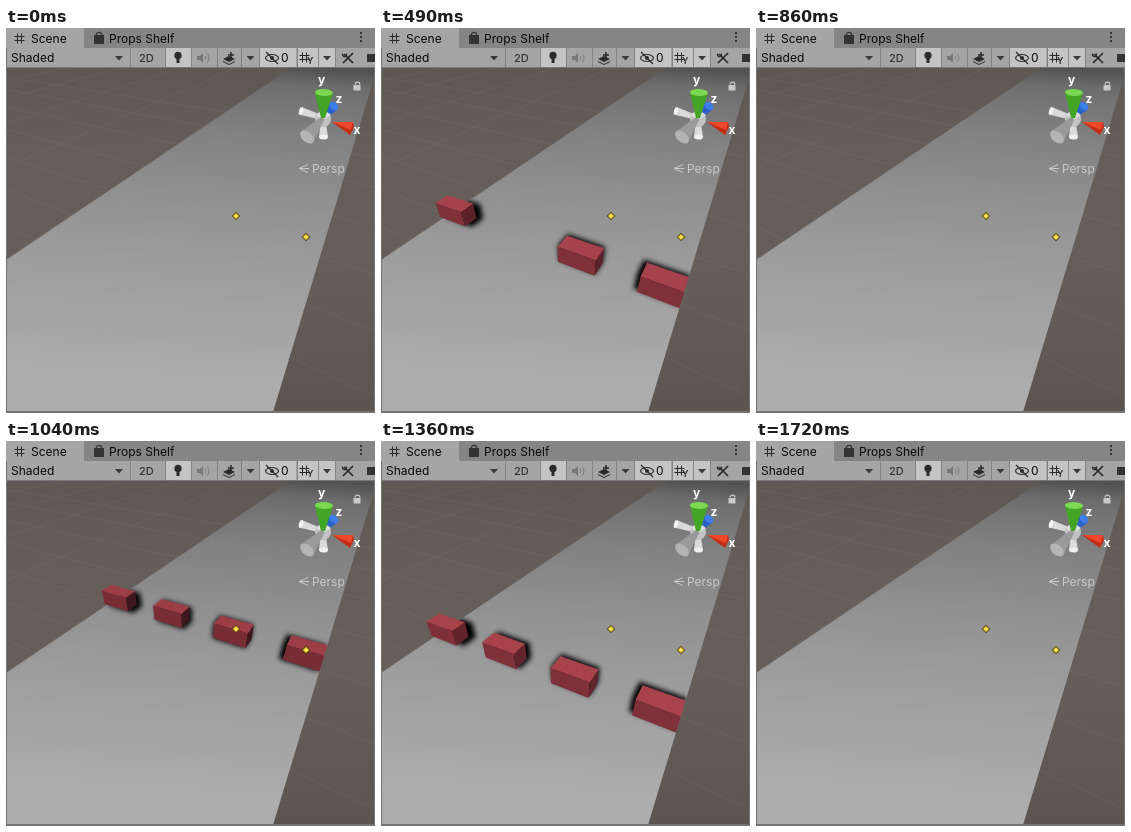
Write an HTML page with a canvas that moves like this. It is 369x385 px and loops after 1810 ms.

```html
<!DOCTYPE html>
<html lang="en">
<meta charset="utf-8">
<title>Sliding boxes in a scene view</title>
<style>
  html, body { margin: 0; width: 100%; height: 100%; overflow: hidden; background: #655e58; }
  canvas { display: block; }
</style>
<canvas id="stage" width="369" height="385"></canvas>
<script>
const ctx = document.getElementById('stage').getContext('2d');
const LOOP = 1810, FPS = 22;
const FONT = 'Inter, Arial, sans-serif';
const INK = '#2b2b2b', TRIM = '#858585', BAR = '#a5a5a5', LIT = '#c4c4c4', PALE = '#c9c9c9';

// Vanishing points: down the ramp, across it, and along its normal.
const RAMP = { x: 393, y: -31 }, ACROSS = { x: -499, y: -31 }, NORMAL = { x: 184, y: 565 };
const SHADE = { x: 215, y: 200 };    // shadows lean towards this point
const rampShape = [[0, 232], [285, 40], [371, 40], [267, 384], [0, 384]];
const openSide = [[-40, 40], [371, 40], [267, 384], [-40, 384]];

function trace(points) {
  ctx.beginPath();
  points.forEach(([x, y]) => ctx.lineTo(x, y));
}
function poly(points, fill) {
  trace(points);
  ctx.fillStyle = fill;
  ctx.fill();
}
function stroke(color, width = 1) {
  ctx.strokeStyle = color;
  ctx.lineWidth = width;
  ctx.stroke();
}
function line(points, color, width) {
  trace(points);
  stroke(color, width);
}
function arc(x, y, r, from, to, color, width) {
  ctx.beginPath();
  ctx.arc(x, y, r, from, to);
  stroke(color, width);
}
function rect(x, y, w, h, fill) {
  ctx.fillStyle = fill;
  ctx.fillRect(x, y, w, h);
}
function oval(x, y, rx, ry, fill, turn = 0) {
  ctx.beginPath();
  ctx.ellipse(x, y, rx, ry, turn, 0, 7);
  ctx.fillStyle = fill;
  ctx.fill();
}
function label(text, x, y, fill = '#090909', weight = 400, size = 12) {
  ctx.font = `${weight} ${size}px ${FONT}`;
  ctx.fillStyle = fill;
  ctx.fillText(text, x, y);
}
function clipped(shape, draw) {
  ctx.save();
  trace(shape);
  ctx.clip();
  draw();
  ctx.restore();
}

function ground() {
  const soil = ctx.createLinearGradient(0, 40, 0, 384);
  ['#5e5853', '#655e58', '#665f59', '#625b55', '#5c554f'].forEach((c, i) => soil.addColorStop(i / 4, c));
  rect(0, 40, 369, 345, soil);
  const ray = (from, slope, reach) =>
    line([[from.x, from.y], [from.x + reach, from.y + reach * slope]], 'rgba(170,170,170,.09)');
  for (let i = 0; i < 12; i++) {
    ray(RAMP, -1 / (1.5 + i * .8), -500);
    ray(ACROSS, .16 + i * .02 + i * i * .005, 900);
  }
  const slab = ctx.createLinearGradient(300, 40, 278, 384);
  for (let p = 0; p <= 1; p += .05) {
    const v = Math.round(82 + 93 * p ** .43);
    slab.addColorStop(p, `rgb(${v},${v},${v})`);
  }
  poly(rampShape, slab);
}

// a: sideways slope on the ramp, u: inverse distance, h: height above it.
function project(a, u, h) {
  const w = u - h;
  return [(RAMP.x * u - a - h * NORMAL.x) / w, (RAMP.y * u + 1 - h * NORMAL.y) / w];
}

function box(lane, age) {
  const a = .73 + .351 * (2 - lane);
  const u = .004456 + .000385 * (2 - lane) - 3.1e-9 * age * age;
  const corners = h => [[-1, -1], [1, -1], [1, 1], [-1, 1]].map(([side, near]) =>
    project(a - side * .086, u - side * .000094 - near * .000083, h));
  const [bl, br, fr, fl] = corners(.000165);
  const [, lowBr, lowFr, lowFl] = corners(0);

  const near = Math.min(1, Math.max(0, (age - 300) / 400));
  const tint = (r, g, b, k) => `rgb(${r * k},${g * k},${b * k})`;
  const [x, y] = project(a, u, 0);
  const dx = (SHADE.x - x) / 20, dy = (SHADE.y - y) / 20;

  clipped(rampShape, () => {
    ctx.filter = 'blur(2.5px)';
    poly([bl, br, lowBr, lowFr, lowFl, fl].map(([px, py]) => [px + dx, py + dy]), '#000');
  });
  clipped(openSide, () => {
    const light = .88 + .12 * near;
    poly([fl, fr, lowFr, lowFl], tint(136, 51, 60, light));
    poly([br, fr, lowFr, lowBr], tint(136, 51, 60, .45 + .5 * near));
    poly([bl, br, fr, fl], tint(178, 71, 80, light));
  });
}

function boxes(t) {
  const step = Math.ceil((Math.floor(t / 10) * 10 + 10) * FPS / 1000) - 1;
  if (step > 0 && step < 19) [0, 2, 3].forEach(lane => box(lane, 12 + 46 * step));
  if (step > 20 && step < 38) [0, 1, 2, 3].forEach(lane => box(lane, 60 + 50 * (step - 21)));
}

function marker(x, y) {
  const diamond = (r, fill) => poly([[x, y - r], [x + r, y], [x, y + r], [x - r, y]], fill);
  diamond(4.3, '#55471b');
  diamond(3.1, '#f3cd31');
  diamond(1.3, '#fff08a');
}

// Cone with its tip at the gizmo's centre and its base at (x, y).
function cone(x, y, r, depth, side, cap) {
  const cx = 317, cy = 90, turn = Math.atan2(y - cy, x - cx) + Math.PI / 2;
  const ox = Math.cos(turn), oy = Math.sin(turn);
  poly([[cx - ox * 2, cy - oy * 2], [cx + ox * 2, cy + oy * 2],
        [x + ox * r, y + oy * r], [x - ox * r, y - oy * r]], side);
  oval(x, y, r, depth, cap, turn);
}

function gizmo() {
  cone(328, 78, 5, 3.5, '#2b62c8', '#3d7eea');
  cone(295, 83, 4, 2, '#dadada', '#f4f4f4');
  cone(317.5, 109, 4.5, 2.5, '#dadada', '#f0f0f0');
  oval(317, 91, 8, 8, '#c2c2c2');
  poly([[310, 87], [317, 82], [325, 87], [317, 92]], '#dedede');
  cone(301, 109, 8, 5, '#9a9a9a', '#b4b4b4');
  cone(318, 64.5, 9, 3.4, '#43a526', '#7bd951');
  poly([[326, 94], [347, 94], [348, 99], [344, 107]], '#c52c15');
  poly([[326, 94], [347, 94], [345, 102]], '#ec482b');
  label('y', 312, 56, '#fff', 700);
  label('z', 329.5, 75, '#fff', 700);
  label('x', 347.5, 106, '#fff', 700);
  rect(347.5, 57, 7, 5.5, PALE);
  arc(351.5, 56.5, 2.4, Math.PI, 0, PALE, 1.2);
  line([[302, 136.5], [293, 140.5], [302, 144.5]], PALE);
  line([[293, 140.5], [303, 140.5]], PALE);
  label('Persp', 306, 145, PALE);
}

const arrow = x => poly([[x - 4, 28], [x + 4, 28], [x, 32.5]], '#3a3a3a');

function hash(x, y) {
  for (const d of [3, 7]) {
    line([[x + d, y], [x + d, y + 10]], INK);
    line([[x, y + d], [x + 10, y + d]], INK);
  }
}

function button(x, w, fill = BAR) {
  rect(x, 20, w, 19, TRIM);
  rect(x + 1, 20, w - 1, 19, fill);
}

function tabs() {
  rect(0, 0, 369, 20, TRIM);
  rect(0, 0, 78, 20, BAR);
  hash(8.5, 5.5);
  label('Scene', 25, 15);
  rect(88, 7, 10, 9, '#333');
  arc(93, 7, 2.7, Math.PI, 0, '#333', 1.3);
  label('Props Shelf', 103, 15);
  for (let y = 4; y < 14; y += 4) rect(354, y, 2, 2, '#333');
}

function toolbar() {
  rect(0, 20, 369, 20, BAR);
  button(124, 31);
  button(159, 26, LIT);
  button(185, 26);
  button(211, 24);
  button(235, 18);
  button(253, 37, LIT);
  button(291, 21, LIT);
  button(312, 17, LIT);
  button(329, 26);
  rect(0, 39, 369, 1, '#777');
  [113, 244.5, 321].forEach(arrow);
  label('Shaded', 5, 34);
  label('2D', 133, 33.5, '#333', 500, 11);
  oval(172, 27.5, 3.6, 3.8, INK);
  rect(170.5, 31, 3, 4, INK);
  poly([[191, 28], [194, 28], [197, 25], [197, 35], [194, 32], [191, 32]], '#777');
  for (const r of [3, 6]) arc(197, 30, r, -.8, .8, '#7b7b7b', 1);
  poly([[217, 31], [223, 28], [229, 31], [223, 34]], INK);
  line([[217, 33.5], [223, 36.5], [229, 33.5]], INK);
  line([[225, 24], [225, 30]], INK, 1.5);
  line([[222, 27], [228, 27]], INK, 1.5);
  oval(266, 30, 7, 4, INK);
  oval(266, 30, 5.8, 3, LIT);
  oval(266, 30, 2, 2, INK);
  line([[260, 24], [272, 36]], INK, 1.3);
  label('0', 275, 34);
  hash(293.5, 24.5);
  label('Y', 301, 36, INK, 600, 9);
  line([[338, 26], [347, 35]], INK, 1.7);
  line([[347, 25], [337, 35]], INK, 1.7);
  arc(338.5, 26.5, 2, -.5, 3.5, INK, 1.5);
  rect(361, 26, 8, 8, '#333');
}

function frame(now) {
  ground();
  boxes(now % LOOP);
  marker(230, 188);
  marker(300, 209);
  gizmo();
  tabs();
  toolbar();
  rect(0, 20, 1, 365, '#747474');
  rect(368, 40, 1, 345, '#747474');
  rect(0, 383, 369, 2, '#747474');
  requestAnimationFrame(frame);
}
requestAnimationFrame(frame);
</script>
</html>
```
